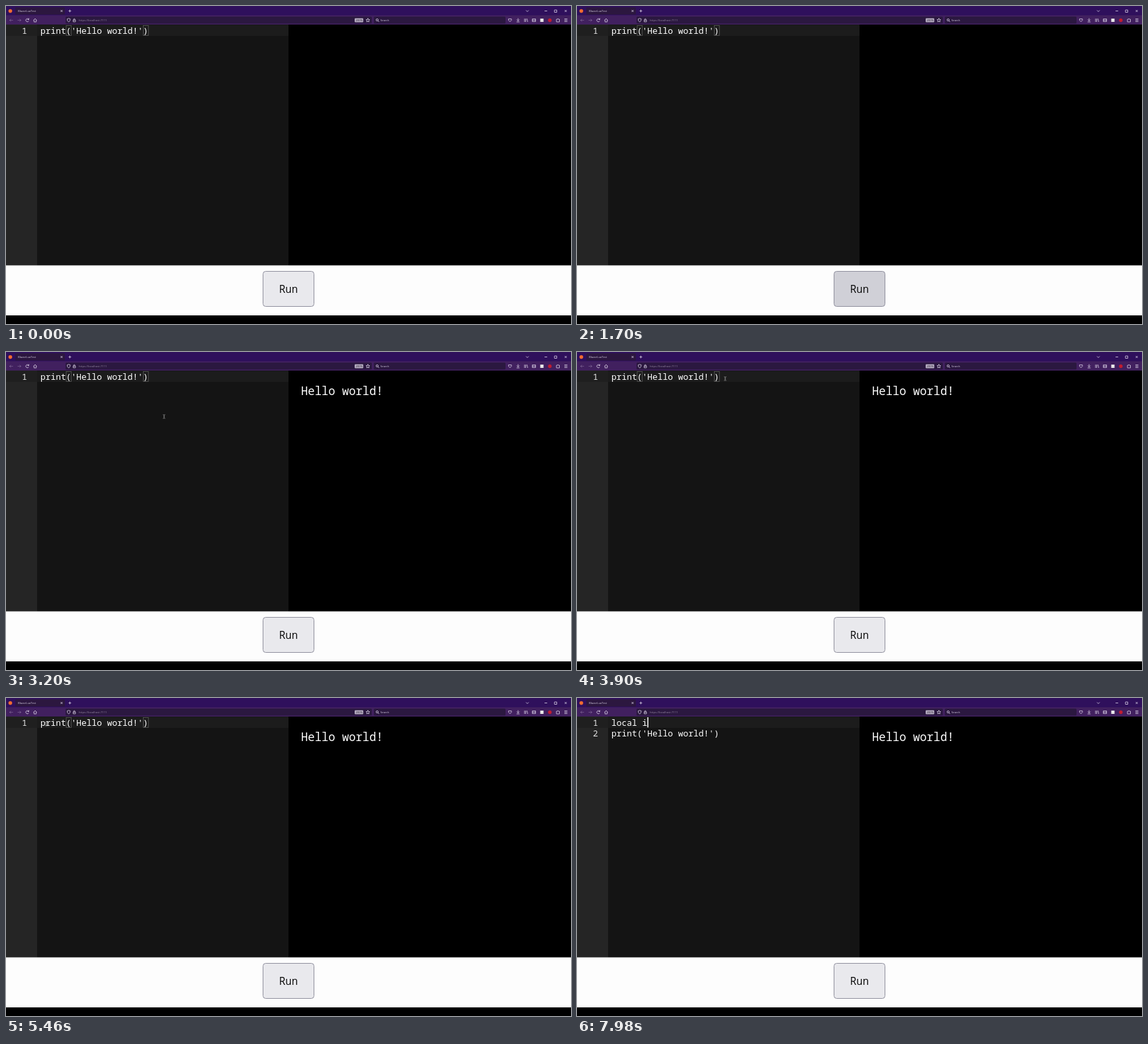
An HTML page for the animation above (8000 ms loop, 854 by 480 pixels).

```html
<!DOCTYPE html>
<html lang="en">
<head>
<meta charset="utf-8">
<title>Editor demo</title>
<style>
html, body { margin: 0; width: 100%; height: 100%; overflow: hidden; background: #000; }
svg { display: block; width: 854px; height: 480px; }
text { white-space: pre; }
.code { font: 12.93px "Noto Sans Mono", monospace; fill: #fff; }
.number { fill: #e4e4e4; text-anchor: middle; }
.output { font: 17.2px "Noto Sans Mono", monospace; fill: #fff; }
.run { font: 15.4px "Open Sans", sans-serif; text-anchor: middle; }
.tiny { font: 4.2px "Open Sans", sans-serif; fill: #d0c8dc; }
.icon { fill: none; stroke: #dcd4e8; stroke-width: .8; }
.box { fill: none; stroke: #5c5c5c; stroke-width: .8; }
</style>
</head>
<body>
<svg viewBox="0 0 854 480">
  <!-- browser chrome -->
  <rect width="854" height="14" fill="#2f105c"/>
  <rect y="14" width="854" height="14" fill="#41205f"/>
  <rect x="14" y="2" width="75" height="11" rx="1.5" fill="#2c173f"/>
  <rect x="90" y="16" width="463" height="10.5" rx="1.5" fill="#2b1840"/>
  <rect x="556" y="16" width="199" height="10.5" rx="1.5" fill="#2b1840"/>
  <circle cx="6.5" cy="7.5" r="2.8" fill="#f06a30"/>
  <text class="tiny" x="18" y="9">BlazorLuaTest</text>
  <text class="tiny" x="110" y="23" style="fill:#93879f">https://localhost:7111</text>
  <text class="tiny" x="566" y="23">Search</text>
  <rect x="527" y="18.5" width="13" height="6" rx="1" fill="#b8aec4"/>
  <text class="tiny" x="528.5" y="23" style="fill:#181020">200%</text>
  <g class="icon">
    <path d="M82.5 6l3 3m0-3l-3 3M94.5 7.5h4M96.5 5.5v4"/>
    <path d="M786 6.5l2 2 2-2M814 7.5h4M829 6h3.5v3.5H829zM844.5 6l3 3m0-3l-3 3"/>
    <path d="M10.5 21.5h-5l2-2m-2 2l2 2M17.5 21.5h5l-2-2m2 2l-2 2" opacity=".35"/>
    <path d="M34 20a2.3 2.3 0 1 0 .3 2.5M34.5 18.5v2h-2"/>
    <path d="M41.5 21.5l2.5-2.5 2.5 2.5M42.3 21v3h3.4v-3"/>
    <path d="M92.5 19.5l2.3-.8 2.3.8q0 3.5-2.3 4.7-2.3-1.2-2.3-4.7z"/>
    <path d="M101.5 21.3h3.5v2.5h-3.5zm.7 0v-1.5q1-1.5 2.1 0v1.5"/>
    <path d="M547 18.5l.8 2 2 .1-1.5 1.4.5 2-1.8-1-1.8 1 .5-2-1.5-1.4 2-.1z"/>
    <circle cx="561" cy="21" r="1.6"/><path d="M562.2 22.2l1.8 1.8"/>
    <path d="M759.5 19.5h4.5v2q-2.25 3.5-4.5 0zM774 18.5v4m-2-2l2 2 2-2m-4.3 3.5h4.6"/>
    <path d="M783.8 19v5m1.8-5v5m1.8-5l1.2 5M795.5 19.5h5v4h-5zm0 2h5"/>
    <path d="M832 20h1.5q.5-2 1.5 0h1.5v4H832zM844 19.5h4.5m-4.5 2h4.5m-4.5 2h4.5"/>
  </g>
  <rect x="807.5" y="19" width="5" height="5" fill="#e8e8e8"/>
  <circle cx="822" cy="21.5" r="2.7" fill="#c01c30"/>

  <!-- editor and output -->
  <rect y="28" width="427" height="364" fill="#141414"/>
  <rect y="28" width="47" height="364" fill="#252525"/>
  <g id="active">
    <rect y="28.5" width="47" height="16.5" fill="#1f1f1f"/>
    <rect x="47" y="28.5" width="380" height="16.5" fill="#1c1c1c"/>
  </g>
  <text class="code number" x="28" y="41.5">1</text>
  <text class="code number" id="second" x="28" y="58">2</text>
  <text class="code" id="typed" x="52" y="41.5"></text>
  <g id="statement">
    <text class="code" x="52" y="41.5">print('Hello world!')</text>
    <g id="brackets">
      <rect class="box" x="91" y="29.5" width="7.7" height="15"/>
      <rect class="box" x="207.5" y="29.5" width="7.7" height="15"/>
    </g>
  </g>
  <rect id="caret" y="29" width="1.6" height="15.5" fill="#f4f4f4"/>
  <path id="beam" d="M-1.5-2.5h1m1 0h1M0-2v4.500M-1.5 3h1m1 0h1" fill="none" stroke="#c4c4c4" stroke-width=".8"/>
  <text class="output" id="output" x="446" y="65">Hello world!</text>

  <!-- button bar -->
  <rect y="391.5" width="854" height="75.5" fill="#fdfdfd"/>
  <rect id="button" x="388.5" y="400.5" width="77" height="53" rx="4" stroke="#8f8f9d"/>
  <text class="run" x="427" y="433">Run</text>
</svg>
<script>
const LOOP = 8000, CHAR = 7.76, LINE = 16.5, LEFT = 52;
const CLICK = 4600, ENTER = 5950, UP = 6050;
const keyTimes = [6740, 6880, 7020, 7160, 7320, 7620, 7800];
const mousePath = [
  [2150, 427, 427], [2480, 258, 170], [2850, 258, 170], [3500, 224, 40],
  [4150, 224, 40], [4520, 53, 38], [5100, 53, 38], [5500, 61, 39]
];
const part = id => document.getElementById(id);
const show = (id, on) => part(id).setAttribute("visibility", on ? "visible" : "hidden");
const move = (id, x, y) => part(id).setAttribute("transform", `translate(${x} ${y})`);

function mouseAt(t) {
  const next = mousePath.findIndex(p => p[0] > t);
  if (next < 0) return mousePath.at(-1).slice(1);
  if (next === 0) return mousePath[0].slice(1);
  const [t0, x0, y0] = mousePath[next - 1], [t1, x1, y1] = mousePath[next];
  const u = (t - t0) / (t1 - t0), k = u * u * (3 - 2 * u);
  return [x0 + (x1 - x0) * k, y0 + (y1 - y0) * k];
}

function draw(t) {
  const split = t >= ENTER;
  const row = split && t < UP ? 1 : 0;
  const keys = keyTimes.filter(k => k <= t);
  const lastAction = Math.max(...[CLICK, ENTER, UP, ...keys].filter(k => k <= t));

  part("typed").textContent = "local i".slice(0, keys.length);
  move("statement", 0, split ? LINE : 0);
  move("active", 0, row * LINE);
  show("second", split);
  show("brackets", !split);
  show("output", t >= 1960);

  move("caret", LEFT + keys.length * CHAR, row * LINE);
  show("caret", t >= CLICK && (t - lastAction) % 1000 < 500);

  const [x, y] = mouseAt(t);
  move("beam", x, y);
  show("beam", t > 2150 && x < 427 && y < 391 && !keys.length);

  const pressed = t >= 1860 && t < 1960, hover = t >= 1200 && t < 2150;
  part("button").setAttribute("fill", pressed ? "#b1b1b9" : hover ? "#d0d0d7" : "#e9e9ed");
}

const start = performance.now();
function tick() {
  draw((performance.now() - start) % LOOP);
  requestAnimationFrame(tick);
}
tick();
</script>
</body>
</html>
```
